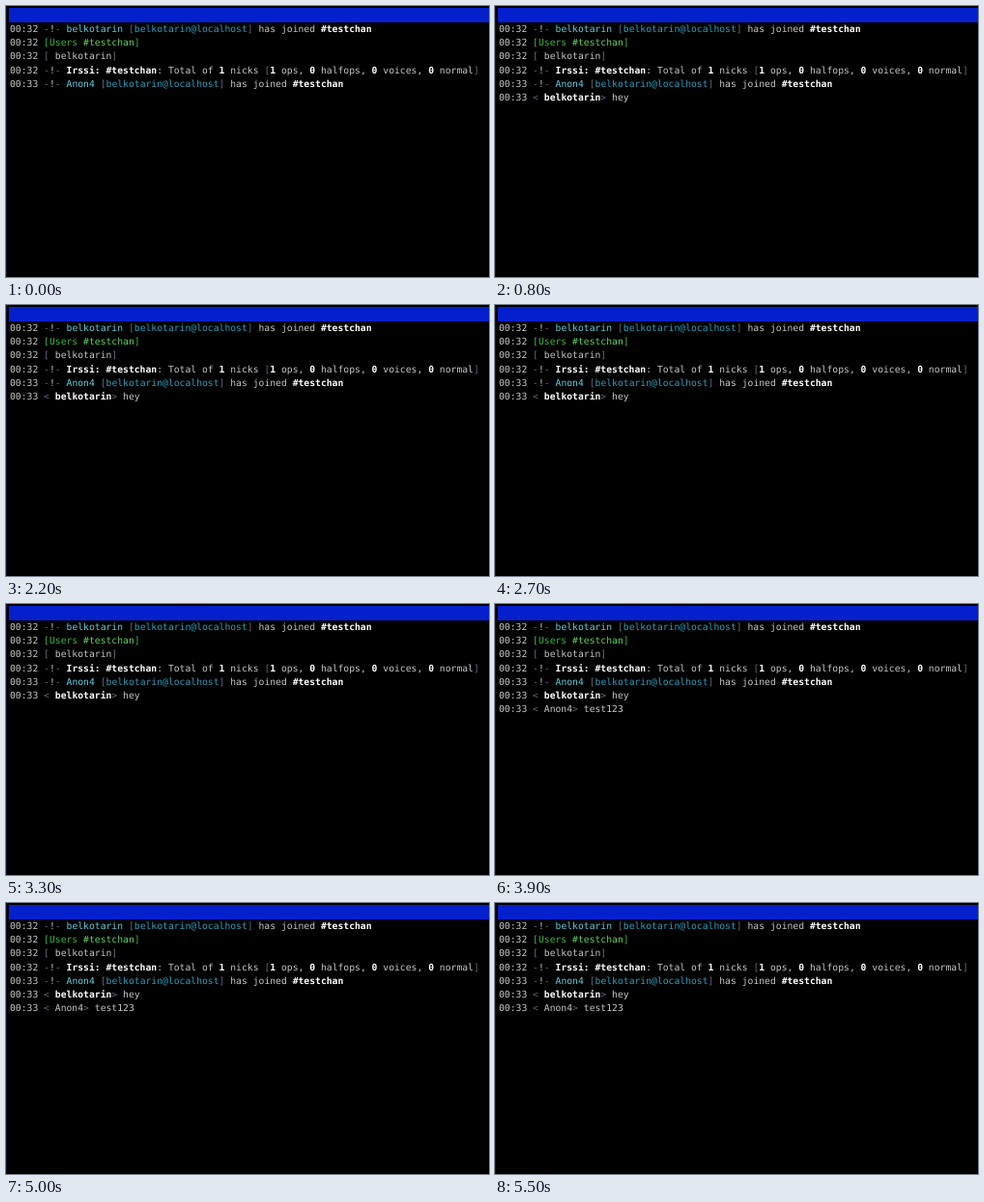
These frames come from a looping animation (500x281 px, 5600 ms). An HTML page:

```html
<!DOCTYPE html>
<html lang="en">
<head>
<meta charset="utf-8">
<title>Chat terminal</title>
<style>
  html, body { margin: 0; width: 100%; height: 100%; overflow: hidden; background: #000; }
  body { position: relative; }
  #edge { position: absolute; left: 0; top: 0; width: 1px; height: 100%; background: #10102c; }
  #bar { position: absolute; left: 3px; right: 0; top: 2px; height: 15px; background: #0420cc; }
  pre {
    position: absolute; left: 4px; top: 18px; margin: 0; color: #c6c6c6;
    font: 9.73px/14.2px "DejaVu Sans Mono", monospace;
    text-rendering: geometricPrecision;
  }
  pre div { height: 14.2px; }
  i { font-style: normal; color: #66667a; }
  b { color: #fff; }
  .nick { color: #62cede; }
  .host { color: #2f9cba; }
  .list { color: #40b844; }
  .chan { color: #62d266; }
</style>
</head>
<body>
<div id="edge"></div>
<div id="bar"></div>
<pre id="log"></pre>
<script>
const LOOP = 5600;
const ME = "belkotarin", PEER = "Anon4";

const span = (cls, text) => `<span class="${cls}">${text}</span>`;
const dim = text => `<i>${text}</i>`;
const bold = text => `<b>${text}</b>`;
const notice = `${dim("-")}!${dim("-")} `;
const joined = nick => notice + span("nick", nick) + " " +
  dim("[") + span("host", ME + "@localhost") + dim("]") + " has joined " + bold("#testchan");
const message = (nick, text) => `${dim("&lt;")} ${nick}${dim("&gt;")} ${text}`;
const count = (n, what) => `${bold(n)} ${what}`;

// [time shown, clock, content]
const lines = [
  [0, "00:32", joined(ME)],
  [0, "00:32", span("list", "[Users ") + span("chan", "#testchan") + span("list", "]")],
  [0, "00:32", `${dim("[")} ${ME}${dim("]")}`],
  [0, "00:32", `${notice}${bold("Irssi:")} ${bold("#testchan")}: Total of ${count(1, "nicks")} ` +
    dim("[") + [count(1, "ops"), count(0, "halfops"), count(0, "voices"), count(0, "normal")].join(", ") + dim("]")],
  [0, "00:33", joined(PEER)],
  [300, "00:33", message(bold(ME), "hey")],
  [3500, "00:33", message(PEER, "test123")]
];

const log = document.getElementById("log");
log.innerHTML = lines.map(([, clock, text]) => `<div>${clock} ${text}</div>`).join("");

function draw() {
  const t = performance.now() % LOOP;
  lines.forEach(([start], i) => {
    log.children[i].style.visibility = t >= start ? "visible" : "hidden";
  });
  requestAnimationFrame(draw);
}
draw();
</script>
</body>
</html>
```
